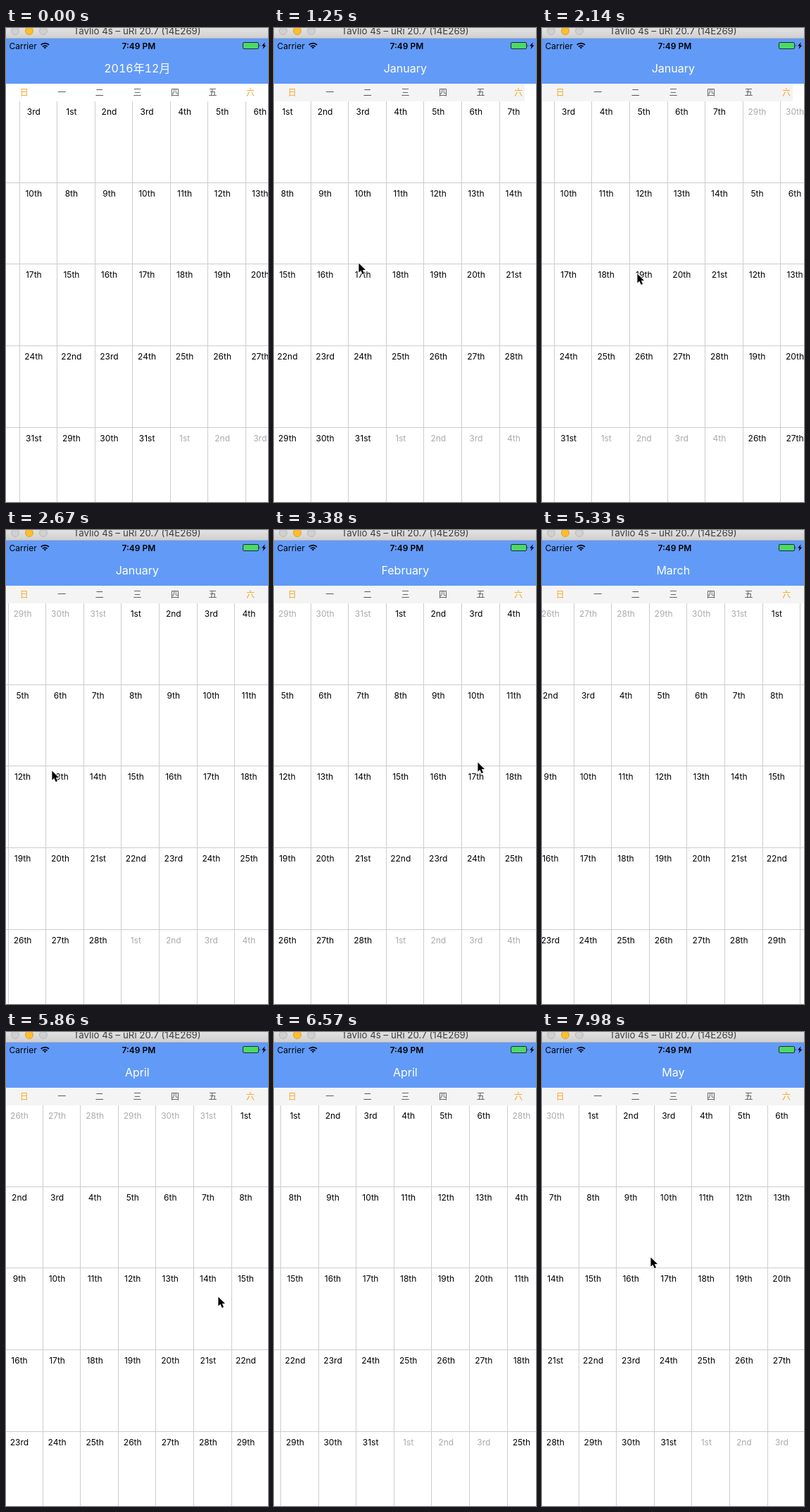
Recreate the animation shown at these times as an HTML page. Size 372 by 672 pixels, loop 8000 ms.

```html
<!DOCTYPE html>
<html lang="en">
<head>
<meta charset="utf-8">
<title>Calendar paging</title>
<style>
  html, body { margin: 0; width: 100%; height: 100%; overflow: hidden; background: #fff; }
  svg { display: block; width: 372px; height: 672px; }
  text { font-family: Inter, "Noto Sans CJK SC", "Noto Sans CJK JP", "Noto Sans CJK", sans-serif; font-size: 12px; }
  .mid { text-anchor: middle; }
  .dim { fill: #aaa; }
  .line { fill: #cdcdcd; }
  #title { font-size: 16px; font-variant-numeric: tabular-nums; }
</style>
</head>
<body>
<svg viewBox="0 0 372 672">
  <defs>
    <linearGradient id="bar" x2="0" y2="1">
      <stop stop-color="#e2e2e2"/><stop offset="1" stop-color="#d0d0d0"/>
    </linearGradient>
  </defs>
  <rect width="372" height="672" fill="#fff"/>
  <g id="grid"></g>
  <g id="pages"></g>

  <rect id="weekBar" x="1" y="79" height="25" fill="#f4f4f4"/>
  <g id="week"></g>

  <rect width="372" height="14" fill="url(#bar)"/>
  <rect y="14" width="372" height="1" fill="#b4b4b4"/>
  <circle cx="13" cy="4" r="5.5" fill="#d0d0d0" stroke="#b9b9b9"/>
  <circle cx="33" cy="4" r="5.5" fill="#fdbe2d" stroke="#e0a029"/>
  <circle cx="53" cy="4" r="5.5" fill="#d0d0d0" stroke="#b9b9b9"/>
  <text class="mid" x="186.2" y="9" style="font-size:13.3px" fill="#3e3e3e">Tavlio 4s – uRi 20.7 (14E269)</text>

  <rect y="15" width="372" height="64" fill="#629af8"/>
  <text x="4.5" y="29.5">Carrier</text>
  <g fill="none" stroke="#000" stroke-width="1.8">
    <path d="M49.6 23.9a8.3 8.3 0 0 1 11.4 0"/>
    <path d="M52 26.4a4.8 4.8 0 0 1 6.6 0"/>
  </g>
  <path d="M53.5 27.6a2.6 2.6 0 0 1 3.6 0L55.3 29.6z"/>
  <text class="mid" x="188.3" y="29.5" font-weight="600">7:49 PM</text>
  <rect x="336.5" y="20.5" width="22" height="9" rx="1.5" fill="#4cd964" stroke="#1d2b3c"/>
  <path d="M359.8 23.2q1.6 1.8 0 3.6z"/>
  <path d="M367.8 20.2L363 25.6h2.8L364.4 30l5-5.6h-2.9z"/>
  <text id="title" class="mid" x="186.3" y="63" fill="#fff"></text>

  <path id="cursor" d="M1.4 1.6V14.6L4.4 11.8L6.7 17L9 16L6.8 10.9H11z"
        stroke="#fff" stroke-width="1.6" paint-order="stroke"/>
</svg>
<script>
const LOOP = 8000, TICK = 88.66;          // the screen refreshes once per tick
const PAGE = 375, COL = PAGE / 7, ROW = 115.7, LEFT = -1.3, TOP = 104;
const TITLES = ["2016年12月", "January", "February", "March", "April", "May"];

// The pointer aims, drags one page from start to top (ending "over" px past it),
// then the page settles while the pointer returns to "drop". Times in ticks.
const SWIPES = [
  { aim: [-9, -6], start: -3, top: 0, hold: 0, end: 3, over: -73.9, grab: [300, 332], drop: [103, 332] },
  { aim: [13, 19], start: 22, top: 26, hold: 2, end: 33, over: -21, grab: [314, 333], drop: [267, 302] },
  { aim: [34, 38], start: 40, top: 44, hold: 0, end: 50, over: 25, grab: [288, 328], drop: [170, 581] },
  { aim: [50, 55], start: 57, top: 60, hold: 0, end: 64, over: 7.1, grab: [307, 339], drop: [291, 379] },
  { aim: [65, 69], start: 71, top: 74, hold: 0, end: 81, over: 42.6, grab: [347, 350], drop: [264, 395] },
  { aim: [82, 90], start: 93, top: 96, hold: 0, end: 99, over: 0, grab: [153, 318], drop: [153, 318] }
];
const POINTER_IN = 6;

const $ = id => document.getElementById(id);
const span = (t, a, b) => Math.min(1, Math.max(0, (t - a) / (b - a)));
const smooth = f => f * f * (3 - 2 * f);
const easeOut = f => 1 - (1 - f) ** 3;
const mix = (p, q, f) => p.map((v, i) => v + (q[i] - v) * f);

function add(parent, tag, attrs, text = "") {
  const node = document.createElementNS("http://www.w3.org/2000/svg", tag);
  for (const key in attrs) node.setAttribute(key, attrs[key]);
  node.textContent = text;
  return parent.appendChild(node);
}

function scrollAt(tick) {
  return SWIPES.reduce((sum, s) => {
    const drag = span(tick, s.start, s.top) ** 2;
    const settle = easeOut(span(tick, s.top + s.hold, s.end));
    return sum + (PAGE + s.over) * drag - s.over * settle;
  }, 0);
}

function pointerAt(tick) {
  return SWIPES.reduce((pos, s) => {
    const exit = [s.grab[0] - 360, s.grab[1] + 28];
    pos = mix(pos, s.grab, smooth(span(tick, ...s.aim)));
    pos = mix(pos, exit, span(tick, s.start, s.top));
    return mix(pos, s.drop, smooth(span(tick, s.top + s.hold, s.end)));
  }, [0, 0]);
}

function ordinal(n) {
  const teen = n > 10 && n < 14;
  return n + (teen ? "th" : ["th", "st", "nd", "rd"][n % 10] || "th");
}

function makePage(index) {
  const g = add($("pages"), "g", {});
  const first = new Date(Date.UTC(2016, 11 + index, 1));
  for (let i = 0; i < 35; i++) {
    const day = new Date(Date.UTC(2016, 11 + index, 1 - first.getUTCDay() + i));
    const inside = day.getUTCMonth() === first.getUTCMonth();
    add(g, "text", {
      class: inside ? "mid" : "mid dim",
      x: 20.3 + COL * (i % 7),
      y: Math.floor(123.4 + ROW * Math.floor(i / 7))
    }, ordinal(day.getUTCDate()));
  }
  return g;
}

for (let r = 1; r < 5; r++)
  add($("grid"), "rect", { class: "line", y: Math.floor(103.5 + ROW * r), width: 372, height: 1 });
const columns = Array.from({ length: 8 }, () =>
  add($("grid"), "rect", { class: "line", y: TOP, width: 1, height: 672 - TOP }));
const pages = Array.from({ length: 7 }, (_, i) => makePage(i));
[..."日一二三四五六"].forEach((c, i) =>
  add($("week"), "text", { class: "mid", x: 25.7 + COL * i, y: 96.3, fill: i % 6 ? "#555" : "#f5a623" }, c));

function draw(now) {
  const tick = Math.floor(now % LOOP / TICK);
  const scroll = scrollAt(tick);
  const [x, y] = pointerAt(tick).map(Math.round);

  pages.forEach((page, i) =>
    page.setAttribute("transform", `translate(${LEFT + PAGE * i - scroll} 0)`));
  const start = Math.ceil(scroll / COL);
  columns.forEach((c, i) => c.setAttribute("x", Math.floor(LEFT + COL * (start + i) - scroll)));

  $("weekBar").setAttribute("width", tick < 1 ? 0 : tick < 29 ? 355 : 371);
  $("title").textContent = TITLES[SWIPES.filter(s => tick >= s.end).length];
  $("cursor").setAttribute("transform", `translate(${x} ${y})`);
  $("cursor").style.display = tick < POINTER_IN ? "none" : "";
}

const begin = performance.now();
function loop() {
  draw(performance.now() - begin);
  requestAnimationFrame(loop);
}
loop();
</script>
</body>
</html>
```
